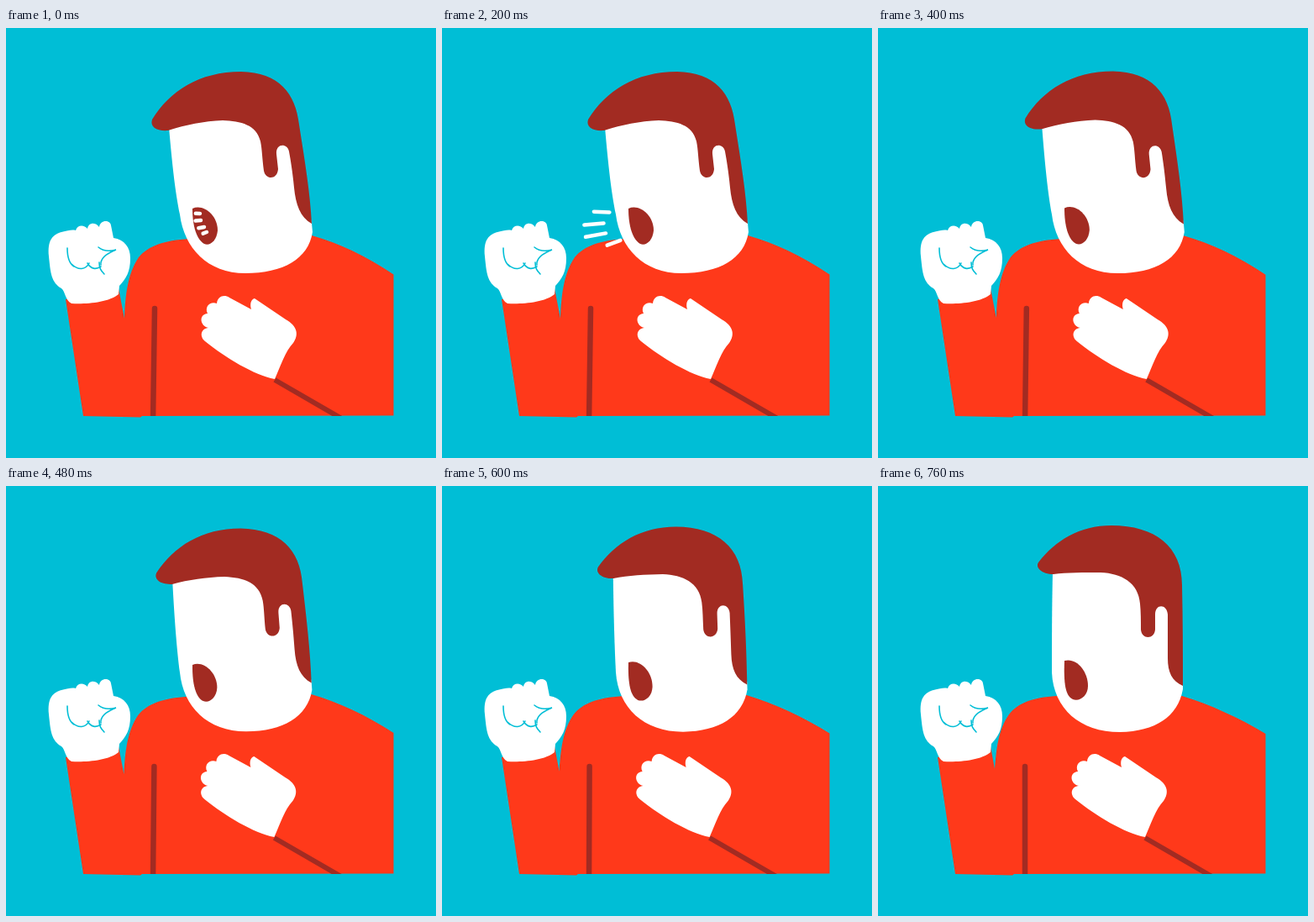
Animation of 512 by 512 pixels, one loop 800 ms. Source, as an HTML page with a canvas:

```html
<!DOCTYPE html>
<html>
<head>
<meta charset="utf-8">
<title>Cough</title>
<style>
  html, body { margin: 0; width: 100%; height: 100%; overflow: hidden; background: #00bed6; }
  canvas { display: block; }
</style>
</head>
<body>
<canvas id="stage" width="512" height="512"></canvas>
<script>
const ctx = document.getElementById('stage').getContext('2d');
const LOOP = 800, STEP = 40;
const SKY = '#00bed6', RED = '#ff391a', BROWN = '#a22b22', WHITE = '#fff';

// Each moving shape has a bent pose and an upright pose with the same commands.
const body = [
  'M71 323L92 462L160 463.5L162 462L461.5 461.5L461.5 293.5C430 272 396 256 364 247L218 251C188 253 170 259 158 273C145 292 142 318 141 346L134 310Z',
  'M71 323L92 462L160 463.5L162 462L461.5 461.5L461.5 295C430 276 395 260 362 250L212 250C184 252 167 258 156 272C143 290 141 314 139 337L134 310Z'
];
const face = [
  'M194 118C198 165 202 198 207 222C212 262 240 292 285 292C330 292 360 275 365 243L364 232L345 150L310 95L204 95Z',
  'M208 103C207 150 207 190 207 222C209 265 240 293 288 293C330 292 357 275 363 242L363 235L352 150L318 90L214 90Z'
];
const hair = [
  'M174 109C195 75 230 52 280 52C325 53 345 78 349 115C356 160 362 195 364 233C350 225 345 210 343 190C341 170 339 158 337 147C335 137 321 137 322 150L324 168C323 181 309 181 307 170C305 155 305 145 303 135C298 115 280 111 258 110C235 111 215 115 193 122C180 123 171 118 174 109Z',
  'M191 91C211 65 240 47 278 47C330 47 362 72 362 118C363 160 363 200 363 238C350 232 345 222 345 205C345 185 345 170 345 153C344 140 330 140 330 153L330 171C329 183 314 183 313 171C313 160 313 150 312 140C310 115 290 104 265 103C245 103 225 103 209 105C195 105 187 97 191 91Z'
];
const mouth = [
  'M222 215C235 209 252 223 252 241C251 253 243 260 236 257C227 252 222 236 222 215Z',
  'M222 208C236 204 250 220 250 238C250 250 240 257 232 254C223 250 221 235 222 208Z'
];
const chestHand = 'M320 418C295 413 262 393 237 373C230 367 232 358 241 357C231 355 229 341 240 340C236 332 243 325 251 328C252 319 260 317 266 321L292 335C290 328 292 323 296 322L333 347C347 355 349 365 342 375C332 386 328 400 320 418Z';
const fist = 'M83 241C85 234 93 234 97 239C98 231 107 231 111 237C112 228 124 228 125 235L128 250C141 252 148 261 148 274C148 291 143 298 135 307L134 317C122 327 95 329 78 328C70 324 71 314 66 310C54 303 53 292 51 272C49 252 56 246 66 243C74 241 79 240 83 241Z';
const creases = 'M73 262C73 273 76 281 81 284M78 281C86 289 95 288 99 280M97 280C101 287 107 288 113 284M111 279C111 286 113 289 117 293M110 261C116 266 124 266 131 264C121 268 112 274 113 282';

// Breath dashes: start x, y, end x, y.
const dashes = [
  [231, 221, 167, 218],
  [232, 229, 152, 236],
  [236, 237, 153, 252],
  [239, 243, 185, 263]
];

const lerp = (a, b, k) => a + (b - a) * k;

function morph([from, to], k) {
  const target = to.match(/[\d.]+/g);
  let i = 0;
  return from.replace(/[\d.]+/g, n => lerp(+n, +target[i++], k).toFixed(2));
}

function fill(d, color) {
  ctx.fillStyle = color;
  ctx.fill(new Path2D(d));
}

function stroke(d, color, width, cap = 'round') {
  ctx.strokeStyle = color;
  ctx.lineWidth = width;
  ctx.lineCap = cap;
  ctx.stroke(new Path2D(d));
}

function drawBreath(time) {
  const head = Math.min(1, 0.08 + 0.92 * Math.pow(time / 280, 0.8));
  const tail = Math.pow(time / 380, 1.1);
  if (tail >= head) return;
  for (const [x, y, endX, endY] of dashes) {
    const at = k => `${lerp(x, endX, k)} ${lerp(y, endY, k)}`;
    stroke(`M${at(tail)}L${at(head)}`, WHITE, 4.5);
  }
}

function draw(time) {
  const p = Math.min(1, Math.max(0, (time - 320) / 440));
  const lift = p * p * (3 - 2 * p);

  ctx.fillStyle = SKY;
  ctx.fillRect(0, 0, 512, 512);
  fill(morph(body, lift), RED);

  ctx.save();
  ctx.beginPath();
  ctx.rect(0, 0, 512, 462);
  ctx.clip();
  stroke(`M${177 - 2 * lift} 334L175 470`, BROWN, 6.5);
  ctx.translate(-2 * lift, 0);
  stroke('M320 419L403 467', BROWN, 6, 'butt');
  fill(chestHand, WHITE);
  ctx.restore();

  fill(fist, WHITE);
  stroke(creases, SKY, 1.6);
  fill(morph(face, lift), WHITE);
  fill(morph(hair, lift), BROWN);
  fill(morph(mouth, lift), BROWN);
  drawBreath(time);
}

function tick() {
  const time = performance.now() % LOOP;
  draw(Math.floor(time / STEP) * STEP);
  requestAnimationFrame(tick);
}
tick();
</script>
</body>
</html>
```
